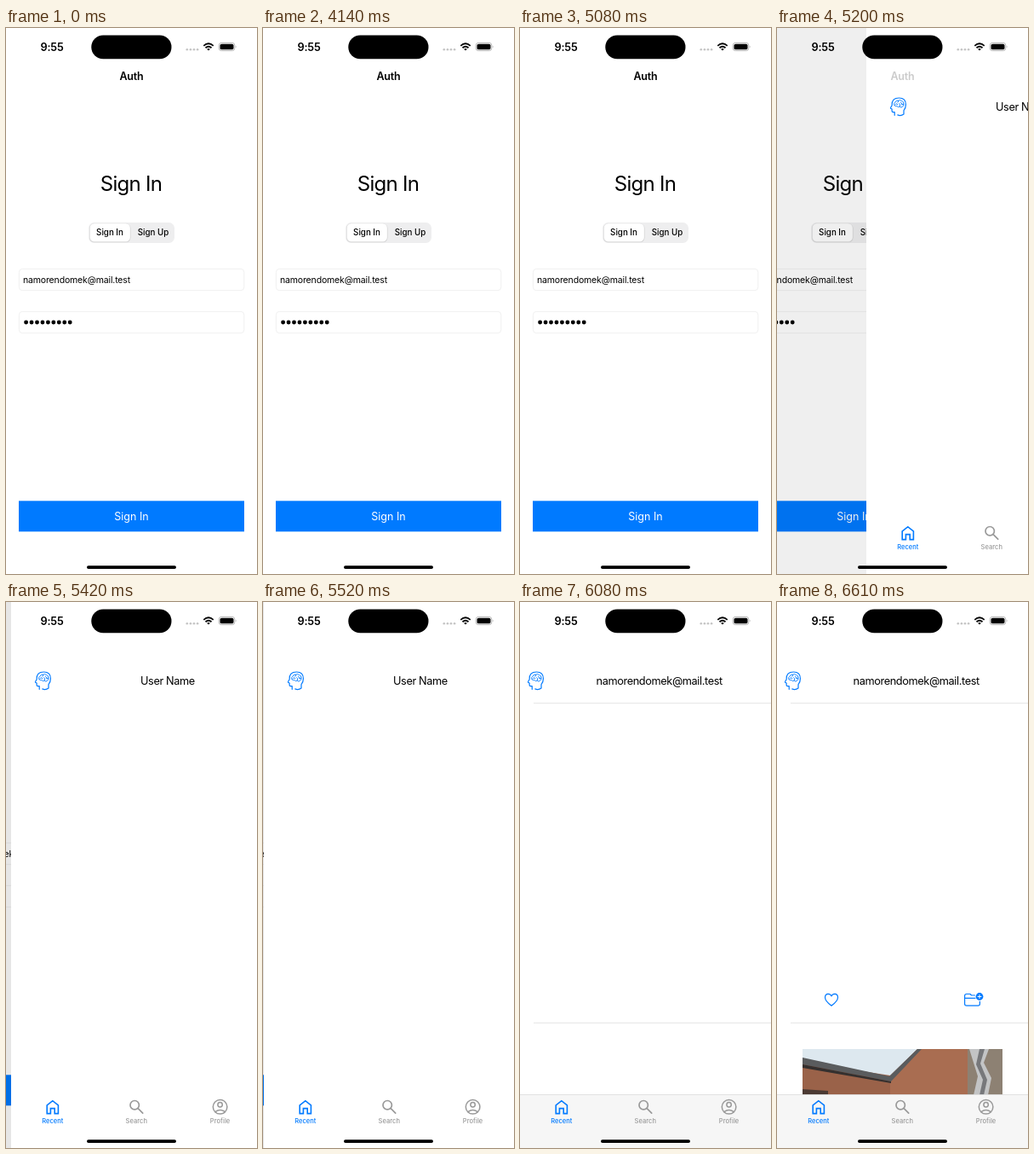
An HTML page for the animation above (6770 ms loop, 295 by 640 pixels).

```html
<!DOCTYPE html>
<html lang="en">
<head>
<meta charset="utf-8">
<title>Sign in</title>
<style>
html, body { margin: 0; width: 100%; height: 100%; overflow: hidden; background: #fff; }
svg { display: block; width: 100vw; height: 100vh; }
text { font-family: Inter, "Liberation Sans", sans-serif; font-size: 12.75px; fill: #000; }
.mid { text-anchor: middle; }
.semi { font-weight: 600; }
.tight { letter-spacing: -.4px; }
.seg { font-size: 9.75px; font-weight: 500; }
.tab { font-size: 7.5px; font-weight: 500; text-anchor: middle; letter-spacing: .05px; }
.blue { fill: #007aff; }
.gray { fill: #999; }
.line { fill: none; stroke: #007aff; stroke-width: 1.2; stroke-linecap: round; stroke-linejoin: round; }
.line.off { stroke: #999; }
.field { fill: #fff; stroke: #ececec; stroke-width: .8; }
.rule { stroke: #dcdcdc; stroke-width: .7; }
</style>
</head>
<body>
<svg viewBox="0 0 295 640" preserveAspectRatio="none">
  <rect width="295" height="640" fill="#fff"/>

  <g id="login">
    <text class="mid" x="147" y="190.5" style="font-size:24px;letter-spacing:-.7px">Sign In</text>
    <rect x="97" y="228" width="101" height="24" rx="6.5" fill="#eeeeef"/>
    <rect x="98" y="229.3" width="48.5" height="22" rx="5.5" fill="#000" opacity=".12"/>
    <rect x="98.5" y="229" width="47.5" height="21.5" rx="5.2" fill="#fff" stroke="#ddd" stroke-width=".4"/>
    <text class="seg mid semi" x="122" y="243.4">Sign In</text>
    <text class="seg mid" x="173" y="243.4">Sign Up</text>
    <rect class="field" x="15.4" y="282.4" width="264.4" height="25.2" rx="3.8"/>
    <text x="20" y="299" style="font-size:10.5px;letter-spacing:-.15px">namorendomek@mail.test</text>
    <rect class="field" x="15.4" y="332.4" width="264.4" height="25.2" rx="3.8"/>
    <g id="dots"></g>
    <rect class="blue" x="15" y="554.3" width="265" height="36"/>
    <text class="mid" x="147.5" y="577" style="font-size:12.5px;fill:#fff">Sign In</text>
  </g>
  <rect id="dim" width="295" height="640" opacity="0"/>

  <g id="page">
    <rect width="295" height="640" fill="#fff"/>
    <g id="head" class="line">
      <path d="M-4.2 10V6.3H-6Q-7.3 6.3-7.3 5V2.7L-8.8 2Q-9.2 1.6-8.8 1L-7.3-1.5Q-7.8-10.3 1-10.3Q9-10.3 9-2.5Q9 2 6.6 4.4V8.8Q3 11.2-.6 9.6"/>
      <path stroke-width=".9" d="M-4.4-1.6Q-6-4.2-3.2-5.3Q-2.6-7.8.2-7.1Q2.2-8.6 4.2-6.8Q7-6 6.5-3.3Q7.2-.8 4.6.1Q3.8 2 2-.2Q-.2 1.1-1.6-.8Q-3.2-.2-4.4-1.6M-3-3.1Q-1.2-4.4-.4-2.5M.2-7Q.8-5.4-.6-4.9M2-.3Q3-2.8 1.4-3.8M3-5.2Q4.6-4.6 4.2-2.6L6.3-3"/>
    </g>
    <text id="user" class="tight" x="152" y="97"></text>

    <g id="rules" class="rule">
      <path d="M16 118.6H295M16 493.4H295"/>
    </g>
    <g id="post">
      <path class="line" d="M64 473.3Q56.5 467.5 56.5 463.4Q56.7 459.5 60.1 459.4Q62.8 459.4 64 462Q65.2 459.4 67.9 459.4Q71.3 459.5 71.5 463.4Q71.5 467.5 64 473.3Z"/>
      <path class="line" d="M232.5 461H228.5L227 459.5H222.7Q220.6 459.5 220.6 461.6V471Q220.6 473.2 222.8 473.2H236.3Q238.4 473.2 238.4 471V468.3M220.6 464.3H233"/>
      <circle class="blue" cx="238" cy="462.5" r="4.4"/>
      <path d="M235.6 462.5H240.4M238 460.1V464.9" stroke="#fff"/>
      <rect x="30" y="524" width="235" height="54" fill="#9a6249"/>
      <path d="M165 524H225V578H133V560Z" fill="#a96d51"/>
      <path d="M30 524H165L133 555L30 539Z" fill="#dde8ef"/>
      <path d="M30 534L132 556L165 524H170L134 562L30 542Z" fill="#5a5c5e"/>
      <path d="M30 542L134 562V564L30 546Z" fill="#34302f"/>
      <path d="M30 571L60 573V578H30Z" fill="#4b3a33"/>
      <rect x="224" y="524" width="41" height="54" fill="#8d8173"/>
      <path d="M226 524H249L243 540L252 558L248 578H231L236 556Z" fill="#c3c4c5"/>
      <path d="M238 524H244L239 541L247 560L243 578H238L242 560L234 542Z" fill="#77787b"/>
    </g>

    <g id="bar">
      <rect y="577.3" width="295" height="62.7" fill="#f6f6f6"/>
      <path d="M0 577.5H295" stroke="#d8d8d8" stroke-width=".7"/>
    </g>
    <path class="line" stroke-width="1.6" style="stroke-width:1.6;stroke-linejoin:miter" d="M42.2 599.6V589.8L48.8 584.7L55.4 589.8V599.6H51.2V593.6H46.4V599.6Z"/>
    <g class="line off" style="stroke-width:1.7">
      <circle cx="145.2" cy="589.7" r="5.2"/>
      <path d="M149.2 593.7L154.7 599.2"/>
    </g>
    <g class="line off" style="stroke-width:1.5">
      <circle cx="245.6" cy="591.8" r="8.3"/>
      <circle cx="245.6" cy="589.2" r="2.7"/>
      <path d="M240 597.6Q245.6 593.2 251.2 597.6"/>
    </g>
    <text class="tab blue semi" x="48.8" y="611.3">Recent</text>
    <text class="tab gray" x="147.3" y="611.3">Search</text>
    <text class="tab gray" x="245.6" y="611.3">Profile</text>
  </g>

  <text id="title" class="mid semi" x="147.5" y="61.3" style="font-size:12.5px;letter-spacing:-.2px">Auth</text>
  <text class="mid semi" x="54" y="26.6" style="font-size:12.75px;letter-spacing:-.2px">9:55</text>
  <rect x="100.3" y="8.5" width="94.2" height="27.8" rx="13.9"/>
  <g fill="#c4c4c4">
    <circle cx="212.8" cy="25.2" r="1.3"/><circle cx="216.9" cy="25.2" r="1.3"/>
    <circle cx="221" cy="25.2" r="1.3"/><circle cx="225.1" cy="25.2" r="1.3"/>
  </g>
  <g fill="none" stroke="#000" stroke-width="1.8">
    <path d="M232.3 20.8Q238 15.6 243.7 20.8M234.5 23.2Q238 20.2 241.5 23.2"/>
    <path d="M236.2 24.7Q238 23.4 239.8 24.7L238 26.6Z" fill="#000" stroke="none"/>
  </g>
  <rect x="250.2" y="17.4" width="18.6" height="9.2" rx="3" fill="none" stroke="#a5a5a5" stroke-width=".8"/>
  <rect x="251.5" y="18.7" width="16" height="6.6" rx="1.9"/>
  <path d="M269.9 20.4Q271.4 22 269.9 23.6Z" fill="#a5a5a5"/>
  <rect x="95" y="630.2" width="105" height="3.8" rx="1.9"/>
</svg>
<script>
const LOOP = 6770, W = 295;
const PARALLAX = 0.3 * W;
// [time, left edge of the incoming page]
const slide = [[0, W], [5200, 105], [5310, 26], [5420, 6], [5520, 1], [5710, 0]];
const LOADED = 5710, ROWS = 6080, POST = 6610;

const el = id => document.getElementById(id);
const show = (id, on) => el(id).setAttribute('visibility', on ? 'visible' : 'hidden');
const move = (id, x, y = 0) => el(id).setAttribute('transform', `translate(${x} ${y})`);

el('dots').innerHTML = Array.from({ length: 9 }, (_, i) =>
  `<circle cx="${23.6 + i * 6.45}" cy="345" r="2.45"/>`).join('');

function draw(t) {
  const x = slide.filter(s => s[0] <= t).pop()[1];
  const done = 1 - x / W;
  const loaded = t >= LOADED;
  move('login', -PARALLAX * done);
  el('dim').setAttribute('opacity', 0.1 * done);
  move('page', x);
  show('page', x < W);
  el('title').setAttribute('opacity', done === 0 ? 1 : Math.max(0, 1 - done * 1.24));

  move('head', loaded ? 18.4 : 37.4, 92.3);
  el('user').textContent = loaded ? 'namorendomek@mail.test' : 'User Name';
  el('user').setAttribute('x', loaded ? 89.6 : 152);
  show('rules', t >= ROWS);
  show('bar', t >= ROWS);
  show('post', t >= POST);
}

const start = performance.now();
function tick() {
  draw((performance.now() - start) % LOOP);
  requestAnimationFrame(tick);
}
draw(0);
requestAnimationFrame(tick);
</script>
</body>
</html>
```
